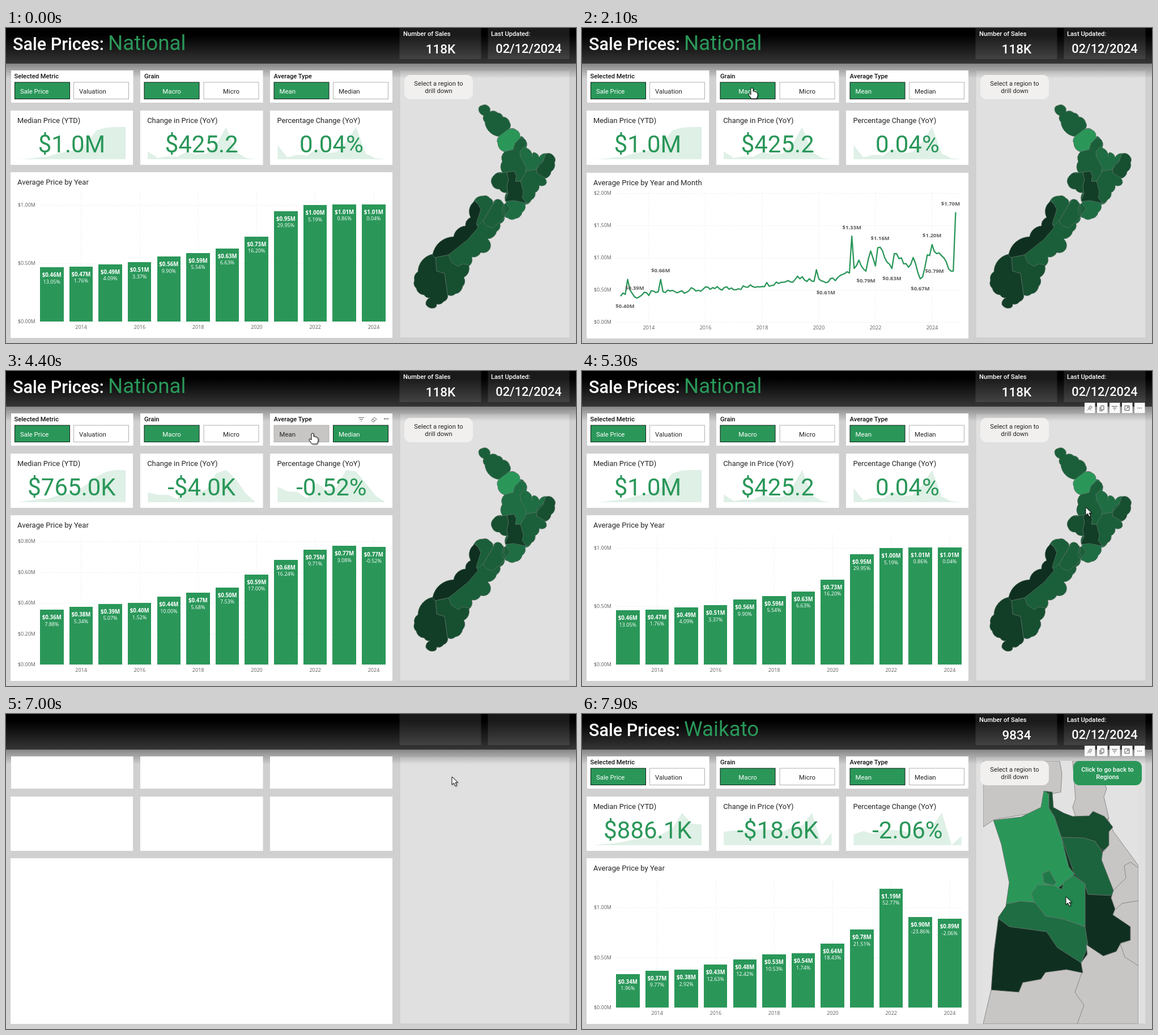
Animation, 1006 px wide and 557 px high, one loop 8000 ms. Source, as an HTML page:

```html
<!DOCTYPE html>
<html lang="en">
<head>
<meta charset="utf-8">
<title>Sale Prices</title>
<style>
html, body { margin: 0; width: 100%; height: 100%; overflow: hidden; background: #d0d0d0; }
svg { display: block; font-family: Roboto, "Open Sans", sans-serif; }
.s { font-family: "Open Sans", "Noto Sans", sans-serif; }
</style>
</head>
<body>
<svg width="1006" height="557" viewBox="0 0 1006 557">
  <defs>
    <linearGradient id="head" x1="0" y1="0" x2="0" y2="1">
      <stop offset=".2" stop-color="#000"/><stop offset="1" stop-color="#363636"/>
    </linearGradient>
    <linearGradient id="shade" x1="0" y1="0" x2="0" y2="1">
      <stop offset="0" stop-opacity=".36"/><stop offset="1" stop-opacity="0"/>
    </linearGradient>
    <clipPath id="mapClip"><path d="M708 83H982V548H708Z"/></clipPath>
    <clipPath id="coastClip"><path id="coastPath"/></clipPath>
    <clipPath id="districtClip"><polygon id="districtPath"/></clipPath>
  </defs>
  <rect width="1006" height="557" fill="#d0d0d0"/>
  <rect x="695" y="75" width="300" height="473" fill="#e0e0e0" stroke="#c9c9c9"/>
  <rect y="63" width="1006" height="26" fill="url(#shade)"/>
  <rect width="1006" height="63" fill="url(#head)"/>
  <path d="M694.5 0h144v55h-144zM850.5 0h144v55h-144z" fill="#fff" opacity=".1"/>
  <path d="M9 75h215.500v57H9zM237 75h216.500v57H237zM466 75h216v57H466zM8 146h216v96H8zM237 146h216.500v96H237zM466 146h216v96H466z" fill="#fff"/>
  <g id="scene"></g>
</svg>
<script>
const DURATION = 8000, GREEN = '#2a9759', INK = '#252423', GREY = '#605e5c';
const G = ['#0f3020', '#123d27', '#174f31', '#1b5f3a', '#1e6d43'];
const byId = id => document.getElementById(id);

const rect = (x, y, w, h, fill, more = '') =>
  `<rect x="${x}" y="${y}" width="${w}" height="${h}" fill="${fill}" ${more}/>`;
const text = (x, y, str, size, fill, more = '') =>
  `<text x="${x}" y="${y}" font-size="${size}" fill="${fill}" ${more}>${str}</text>`;
const path = (d, fill, more = '') => `<path d="${d}" fill="${fill}" ${more}/>`;
const poly = (points, fill, more = '') => `<polygon points="${points}" fill="${fill}" ${more}/>`;
const MID = 'text-anchor="middle"', END = 'text-anchor="end"', BOLD = 'font-weight="700"', MEDIUM = 'font-weight="500"';
const SMALL = 'class="s"';
const clamp = v => Math.max(0, Math.min(1, v));
const ease = v => v * v * (3 - 2 * v);
const mix = (a, b, p) => a + (b - a) * p;
const money = v => `$${v.toFixed(2)}M`;
const noise = i => { const v = Math.sin(i * 12.9898) * 43758.5453; return v - Math.floor(v) - .5; };

// Prices follow from the first price and the growth rates.
function dataset(first, scale, tick, ticks, kpi, growth) {
  const prices = [first];
  for (let i = 1; i < 12; i++) prices.push(prices[i - 1] * (1 + growth[i] / 100));
  const change = prices.map((price, i) => price - price / (1 + growth[i] / 100));
  return { prices, change, growth, scale, tick, ticks, kpi };
}
const mean = dataset(.464, 206, .5, 2, ['$1.0M', '$425.2', '0.04%'],
  [13.05, 1.76, 4.09, 3.37, 9.9, 5.54, 6.63, 16.2, 29.95, 5.19, .86, .04]);
const median = dataset(.356, 272.5, .2, 4, ['$765.0K', '-$4.0K', '-0.52%'],
  [7.88, 5.34, 5.07, 1.52, 10, 5.68, 7.53, 17, 16.24, 9.71, 3.08, -.52]);
const waikato = dataset(.336, 177, .5, 2, ['$886.1K', '-$18.6K', '-2.06%'],
  [1.96, 9.77, 2.92, 12.63, 12.42, 10.53, 1.74, 18.43, 21.51, 52.77, -23.86, -2.06]);
const switches = [[0, mean, 1], [3300, median, 350], [4500, mean, 320], [5600, waikato, 280]];

// Turning points of the monthly price [month, price / 10k]; the months between wander.
const turns = [[0, 40], [2, 43], [3, 66], [4, 50], [6, 39], [16, 47], [17, 66], [18, 47], [54, 54], [74, 66],
  [75, 71], [82, 63], [83, 81], [84, 67], [87, 61], [97, 76], [98, 133], [99, 83], [101, 96], [104, 79],
  [106, 110], [108, 87], [109, 115], [110, 116], [115, 83], [116, 106], [122, 85], [124, 100], [127, 67],
  [128, 70], [130, 104], [131, 103], [132, 120], [134, 106], [136, 103], [140, 79], [141, 79], [142, 170]];
const months = Array.from({ length: 143 }, (_, i) => {
  const k = turns.findIndex(turn => turn[0] >= i), [m, v] = turns[k];
  if (m === i) return v;
  const [m0, v0] = turns[k - 1];
  return mix(v0, v, (i - m0) / (m - m0)) + 8 * noise(i);
});
const monthX = i => 68 + 4.165 * i, monthY = v => 520 - 1.142 * v;
// Labelled months: [month, dy, dx]
const marks = [[0, 17, 8], [6, -16, 0], [17, -16, 0], [87, 17, 0], [98, -16, 0], [104, 17, 0], [110, -16, 0],
  [115, 17, 0], [127, 17, 0], [140, 0, -29], [132, -16, 0], [142, -15, -9]];

// Joins points with arcs that bulge outward, which gives the coast its round bumps.
function arcs(points) {
  const pts = points.split(' ').map(p => p.split(',').map(Number));
  return `M${pts[0]}` + pts.map(([x, y], i) => {
    const next = pts[(i + 1) % pts.length], r = .8 * Math.hypot(next[0] - x, next[1] - y);
    return `A${r} ${r} 0 0 1 ${next}`;
  }).join('') + 'Z';
}
const north = '834,143 840,137 851,138 854,148 868,150 877,157 889,167 888,179 900,180 907,192 914,195 918,212 929,228 931,220 941,229 954,222 967,227 968,238 962,254 951,266 953,276 941,278 934,291 927,304 916,312 911,326 899,337 886,336 876,325 883,309 884,291 871,285 858,277 860,262 877,256 876,236 880,219 868,204 870,192 845,166 843,155';
const south = '825,308 842,297 854,301 860,311 866,303 876,308 878,322 880,334 872,346 866,360 850,373 854,391 838,397 822,405 817,421 808,441 806,457 793,470 780,472 772,484 760,488 756,495 741,489 748,477 738,472 724,460 721,446 727,431 753,400 790,369 811,350 820,335';
const coast = arcs(north) + arcs(south);
byId('coastPath').setAttribute('d', coast);

// Regions overshoot the coast and are clipped to it: [shade, outline]
const waikatoShape = '895,215 898,204 908,194 925,200 907,218 908,228 918,246 917,256 908,271 899,271 901,262 897,253 870,257 865,230 878,219';
const regions = [
  [5, '888,178 868,193 860,203 874,220 895,215 898,204 908,194 912,180'],
  [4, '907,218 922,200 960,215 955,228 939,241 936,250 918,253 908,228'],
  [2, '955,215 985,230 960,275 937,257 936,250 948,236'],
  [3, '936,250 937,257 965,272 940,300 919,310 911,300 908,271 918,253'],
  [2, '884,255 850,250 850,290 886,293 884,280 887,268'],
  [1, '884,255 897,253 901,262 899,271 908,271 913,290 911,300 919,310 880,306 886,293 884,280 887,268'],
  [4, '870,308 896,305 925,311 905,345 870,335'],
  [3, '820,290 856,295 860,311 842,341 833,349 829,345 838,321 833,311'],
  [3, '860,311 870,295 890,320 873,342 858,353 848,350 842,341'],
  [0, '820,300 833,311 838,321 830,346 833,353 815,374 781,401 758,406 735,400'],
  [2, '781,401 786,414 798,422 806,417 828,421 790,485 779,471 774,434 760,430 758,406'],
  [1, '745,395 758,406 760,430 774,434 779,471 790,500 700,500 700,430'],
];

const districtEdge = '815,136 830,138 832,165 850,175 866,181 895,180 902,172 922,181 937,200 930,208 930,232 919,243 917,258 938,312 934,325 941,345 937,355 968,376 968,400 951,405 943,420 920,428 890,408 892,425 881,440 884,458 855,452 818,457 810,469 778,475 771,492 722,488 727,420 735,359 748,340 754,298 740,230 726,188 775,182 810,165';
byId('districtPath').setAttribute('points', districtEdge);
const districts = [
  [GREEN, '800,120 824,142 824,166 834,182 846,218 859,270 869,283 850,300 800,340 700,340 700,120'],
  [G[2], '824,130 850,160 950,160 940,240 916,240 905,225 846,218 834,182 824,166'],
  ['#1c643d', '846,218 885,219 905,225 916,240 945,312 932,321 893,319 887,300 869,283'],
  [G[4], '730,340 774,331 797,333 888,377 893,410 881,440 839,413 820,385 754,376 730,358'],
  ['#23864f', '793,318 804,302 832,303 847,310 850,297 868,285 888,301 888,376 850,363 818,357 797,330'],
  ['#207848', '813,282 825,277 837,298 832,303 815,298'],
];

const moves = [[200, 400, 0], [700, 377, 104], [1900, 377, 104], [2050, 300, 106], [2250, 300, 106], [2600, 627, 115],
  [3450, 627, 115], [3700, 541, 110], [4800, 541, 110], [5250, 889, 241], [6200, 889, 241],
  [6700, 787, 111], [7400, 787, 111], [7900, 854, 323], [8000, 854, 323]];

function cursor(t) {
  if (t < moves[0][0]) return '';
  const i = moves.findIndex(m => m[0] > t), [a, b] = [moves[i - 1], moves[i]];
  const p = ease((t - a[0]) / (b[0] - a[0]));
  const x = mix(a[1], b[1], p), y = mix(a[2], b[2], p);
  const hand = (y > 95 && y < 126 && x < 680) || (t > 6550 && t < 6950);
  const d = hand
    ? 'M-2 1Q0-1 2 1V6Q5 5 5 7Q8 6 8 8Q10 8 10 10V14L8 19H-1L-6 12Q-6 9-4 10L-2 12Z'
    : 'M0 0V14L3.500 11L6 16.500L8.500 15.300L6 10H10.500Z';
  return path(d, '#fff', `stroke="#111" transform="translate(${x} ${y})" style="filter:drop-shadow(1px 1px 1px #0006)"`);
}

function button(x, label, on, hover, centred) {
  const fill = on ? GREEN : hover ? '#c8c6c4' : '#fff';
  return rect(x + .5, 96, 97, 29.5, fill, `stroke="${on ? '#0c1f14' : '#b3b0ad'}"`) +
    text(centred ? x + 49 : x + 10, 116, label, 11.4, on ? '#fff' : INK, centred ? MID : '');
}

function slicers(t) {
  const micro = t >= 800 && t < 2100, med = t >= 3250 && t < 4450;
  let s = ['Selected Metric', 'Grain', 'Average Type']
    .map((name, i) => text([14.5, 244, 472.5][i], 89, name, 11.2, '#111', MEDIUM)).join('');
  s += button(15, 'Sale Price', true) + button(119, 'Valuation');
  s += button(243.5, 'Macro', !micro, t >= 2000 && micro, true) + button(348.5, 'Micro', micro, t >= 650 && t < 800, true);
  s += button(472.5, 'Mean', !med, t >= 4400 && med) + button(577, 'Median', med, t >= 2800 && t < 3250);
  if (t >= 2450 && t < 4850)
    s += path('M622 82.500h10M624 85.500h6M626 88.500h2M645 87l5-5 4 3-5 5h-2zM647 85l4 3', 'none', 'stroke="#666"') +
      path('M667 84.500h2m1 0h2m1 0h2', 'none', 'stroke="#666" stroke-width="1.800"');
  return s;
}

function spark(x, values) {
  const low = Math.min(...values), high = Math.max(...values);
  const points = values.map((v, i) => `${x + 17.3 * i},${232 - 57 * (v - low) / (high - low)}`);
  return poly(`${x},232 ${points.join(' ')} ${x + 190.3},232`, '#dff0e6');
}

function kpis(data) {
  const names = ['Median Price (YTD)', 'Change in Price (YoY)', 'Percentage Change (YoY)'];
  return [data.prices, data.change, data.growth].map((values, i) => {
    const x = 20 + 229.2 * i;
    return spark(x + 1, values) + text(x, 168, names[i], 12.9, INK) +
      text(x + 96, 219.5, data.kpi[i], 42, GREEN, MID);
  }).join('');
}

const dash = 'stroke="#dedede" stroke-dasharray="1 3"';

// Axis labels and dotted lines shared by both charts
function grid(base, step, tick, ticks, firstYear, yearStep, right) {
  let s = '';
  for (let i = 0; i <= ticks; i++) {
    const y = base - i * step;
    if (y > 280) s += text(52, y + 3.3, money(i * tick), 9, GREY, `${SMALL} ${END}`) +
      path(`M60 ${Math.round(y) + .5}H${right}`, 'none', dash);
  }
  for (let k = 0; k < 6; k++) {
    const x = firstYear + yearStep * k;
    s += path(`M${x} 290V${base}`, 'none', dash) + text(x, base + 13, 2014 + 2 * k, 9, GREY, `${SMALL} ${MID}`);
  }
  return s;
}

function bars(from, to, p, grow) {
  const scale = mix(from.scale, to.scale, p);
  return grid(519, to.tick * scale, to.tick, to.ticks, 132.6, 103.28, 670) + to.prices.map((price, i) => {
    const h = mix(from.prices[i], price, p) * scale * grow, x = 60 + 51.64 * i, mid = x + 20.8;
    const bar = rect(x, 519 - h, 41.5, h, GREEN, 'shape-rendering="crispEdges"');
    return grow < .5 ? bar : bar +
      text(mid, 519 - h + 17, money(price), 9.7, '#fff', `${SMALL} ${MID} ${BOLD}`) +
      text(mid, 519 - h + 28.7, `${to.growth[i].toFixed(2)}%`, 9, '#fff', `${SMALL} ${MID}`);
  }).join('');
}

function lines(t) {
  const rise = ease(clamp((t - 1050) / 200));
  const points = months.map((v, i) => `${monthX(i)},${monthY(v * rise)}`).join(' ');
  const labels = marks.map(([i, dy, dx]) => text(monthX(i) + dx, monthY(months[i]) + dy + 3.5,
    money(months[i] / 100), 9.5, GREY, `${SMALL} ${MID} ${BOLD}`)).join('');
  return grid(520, 57.1, .5, 4, 118, 100, 667) +
    `<polyline points="${points}" fill="none" stroke="${GREEN}" stroke-width="2.300" stroke-linejoin="round"/>` +
    (rise === 1 ? labels : '');
}

function chart(t, from, to, p) {
  const micro = t >= 900 && t < 2200, dy = micro ? 1 : 0;
  let s = rect(8, 255 + dy, 674, 293, '#fff');
  if (t >= 7000 && t < 7300) return s;
  s += text(20, 277 + dy, `Average Price by Year${micro ? ' and Month' : ''}`, 13.1, INK);
  if (micro) return s + (t >= 1100 && t < 2150 ? lines(t) : '');
  const grow = t < 2200 ? 1 : ease(clamp((t - 2200) / 300));
  return s + bars(from, to, p, grow);
}

function pill(x, rows, on) {
  return rect(x, 83, 121, 43, on ? GREEN : '#f1f0ef', 'rx="11"') +
    rows.map((row, i) => text(x + 60.5, 102 + 13 * i, row, 11.2, on ? '#fff' : INK, `${MID} ${on ? MEDIUM : ''}`)).join('');
}
const hint = pill(703, ['Select a region to', 'drill down']);

function country(data) {
  const picked = data === waikato;
  const line = picked ? '' : 'stroke="#5f7568" stroke-width=".700" stroke-linejoin="round"';
  const land = path(coast, G[3]) + regions.map(([shade, points]) => poly(points, G[shade] || GREEN, line)).join('');
  return `<g clip-path="url(#coastClip)"><g opacity="${picked ? .6 : 1}">${land}</g>` +
    poly(waikatoShape, G[data === median ? 4 : 3], line) + '</g>' + path(coast, 'none', line) +
    (picked ? pill(703, ['Click to view Waikato', 'Districts'], true) : hint);
}

function districtMap() {
  const neighbours = [
    '708,83 843,83 847,105 845,138 824,142 815,168 790,176 727,187 708,200',
    '866,83 925,83 929,98 918,112 926,132 921,146 930,185 872,185 866,165 871,150',
    '928,185 938,208 982,268 982,548 708,548 722,488 880,400 913,240',
  ];
  const borders = 'M882 458L870 492L886 515L874 548M982 330L953 335L942 345M968 400L950 406L958 430L982 445M930 232L915 250M938 312L960 290L957 268L968 262L982 272';
  return '<g clip-path="url(#mapClip)" stroke="#777" stroke-width=".800" stroke-linejoin="round">' +
    rect(708, 83, 274, 465, '#e2e2e2', 'stroke="none"') +
    neighbours.map(points => poly(points, '#c8c6c5')).join('') + path(borders, 'none') +
    `<g clip-path="url(#districtClip)">${poly(districtEdge, G[0])}` +
    districts.map(([fill, points]) => poly(points, fill)).join('') + '</g>' + poly(districtEdge, 'none') + '</g>' +
    hint + pill(867, ['Click to go back to', 'Regions'], true);
}

function mapIcons() {
  const glyphs = ['M-4 4L-1 1M-3-1L2 4M-1-2L2-4L4-2L2 1Z', 'M-2-4H3V3H-2ZM-4-2V5H1', 'M-5-3H5M-3 0H3M-1 3H1',
    'M-4-4H4V4H-4ZM0-2H2V0M2-2L-2 2', 'M-4 0H-2M-1 0H1M2 0H4'];
  return glyphs.map((d, i) => rect(887 + 22 * i, 56, 18.5, 18.5, '#fafafa') +
    path(d, 'none', `stroke="#555" transform="translate(${896 + 22 * i} 65.500)"`)).join('');
}

function header(region, sales) {
  return text(12, 39, 'Sale Prices:', 30.5, '#fff', MEDIUM) + text(180, 39, region, 36.8, GREEN) +
    text(701, 14, 'Number of Sales', 11.2, '#fff', MEDIUM) + text(767, 45, sales, 22.5, '#fff', `${MID} ${MEDIUM}`) +
    text(856, 14, 'Last Updated:', 11.2, '#fff', MEDIUM) + text(922.5, 44, '02/12/2024', 21.8, '#fff', `${MID} ${MEDIUM}`);
}

function draw(t) {
  const n = switches.filter(s => s[0] <= t).length - 1;
  const [start, data, span] = switches[n];
  const before = n ? switches[n - 1][1] : data;
  const p = ease(clamp((t - start) / span));
  const loaded = time => t < 7000 || t >= time;
  const picked = data === waikato;
  let s = chart(t, before, data, p);
  if (loaded(7200)) s += header(picked ? 'Waikato' : 'National', picked ? '9834' : '118K') + slicers(t);
  if (loaded(7300)) s += kpis(data);
  if (t < 7000) s += country(data);
  else if (t >= 7500) s += districtMap();
  if (t >= 5000 && loaded(7400)) s += mapIcons();
  return s + cursor(t);
}

const scene = byId('scene');
let shown = '';
function frame(now) {
  const next = draw(now % DURATION);
  if (next !== shown) scene.innerHTML = shown = next;
  requestAnimationFrame(frame);
}
requestAnimationFrame(frame);
</script>
</body>
</html>
```
